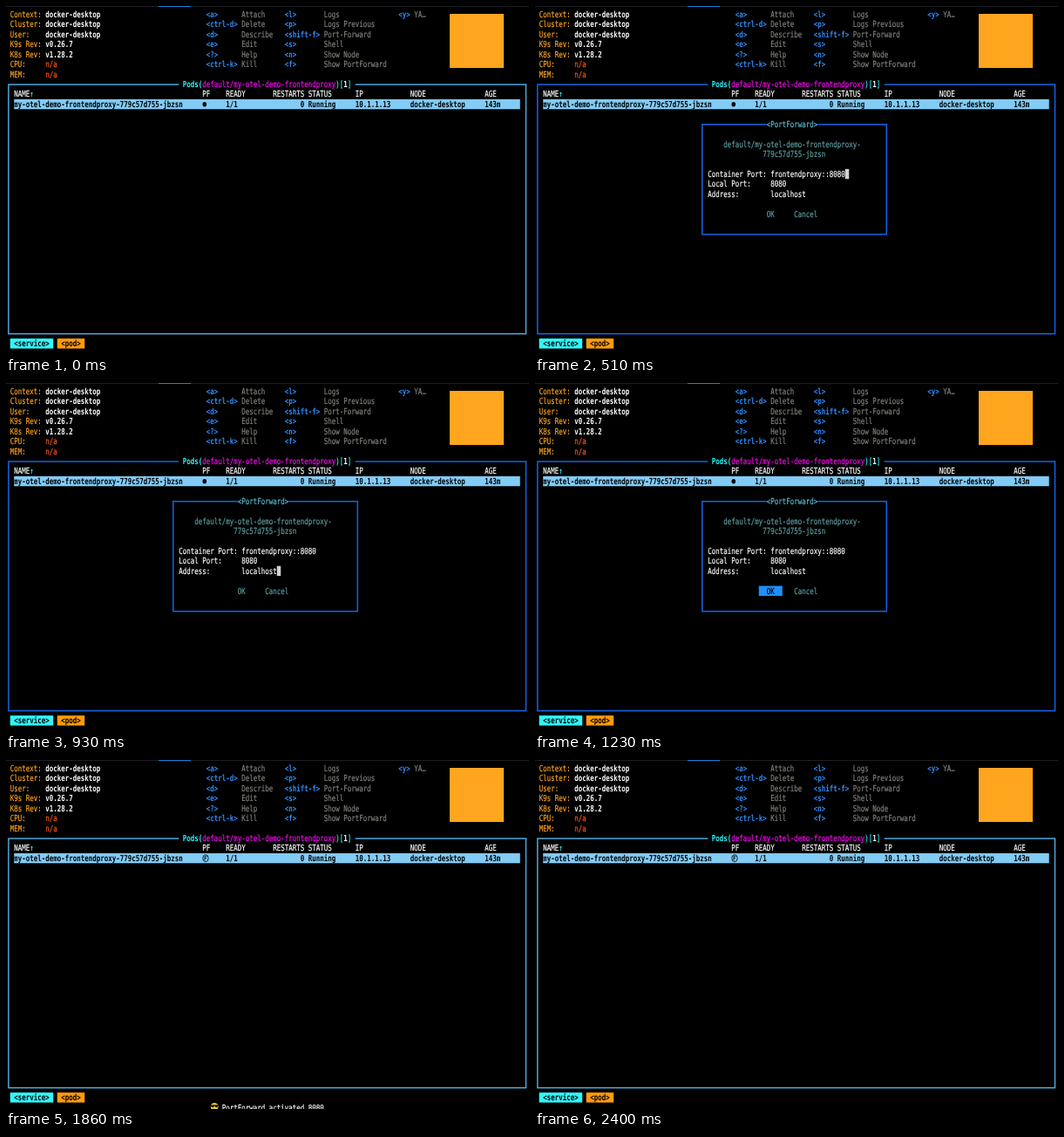
An HTML page for the animation above (2.43 s loop, 600x400 px).

```html
<!DOCTYPE html>
<html lang="en">
<head>
<meta charset="utf-8">
<title>Port forward in a terminal</title>
<style>
  html, body { margin: 0; width: 100%; height: 100%; overflow: hidden; background: #000; }
  svg { display: block; width: 600px; height: 400px; }
  text {
    font: 9.8px "DejaVu Sans Mono", "Liberation Mono", monospace;
    text-rendering: geometricPrecision;
    fill: currentColor;
    stroke: currentColor;
    stroke-width: .2;
  }
  .b { font-weight: bold; stroke: none; }
  .orange { color: #ffa51e; }
  .white { color: #fff; }
  .red { color: #ff5a14; }
  .blue { color: #2d8cfa; }
  .dim { color: #80807c; }
  .aqua { color: #28f5fa; }
  .pink { color: #fa0af5; }
  .steel { color: #5f9ea0; }
  .sky { color: #5abed2; }
  .box { fill: none; stroke: #1464e6; stroke-width: 1.5; }

  .pane, .dialog, .cur, .flash, .idle, .fwd { animation: 2430ms step-end infinite; }
  .pane { animation-name: pane; }
  .dialog { animation-name: dialog; }
  .cur.port { animation-name: port; }
  .cur.local { animation-name: local; }
  .cur.address { animation-name: address; }
  .cur.ok { animation-name: ok; }
  .flash { animation-name: flash; }
  .idle { animation-name: idle; }
  .fwd { animation-name: fwd; }

  @keyframes pane { 0%, 54.32%, 100% { stroke: #4fa8dc; } 14.81% { stroke: #1464e6; } }
  @keyframes dialog { 0%, 54.32%, 100% { opacity: 0; } 14.81% { opacity: 1; } }
  @keyframes port { 0%, 24.69%, 100% { opacity: 0; } 14.81% { opacity: 1; } }
  @keyframes local { 0%, 34.57%, 100% { opacity: 0; } 24.69% { opacity: 1; } }
  @keyframes address { 0%, 44.44%, 100% { opacity: 0; } 34.57% { opacity: 1; } }
  @keyframes ok { 0%, 54.32%, 100% { opacity: 0; } 44.44% { opacity: 1; } }
  @keyframes flash { 0%, 95.06%, 100% { opacity: 0; } 54.32% { opacity: 1; } }
  @keyframes idle { 0% { opacity: 1; } 66.67%, 100% { opacity: 0; } }
  @keyframes fwd { 0% { opacity: 0; } 66.67%, 100% { opacity: 1; } }
</style>
</head>
<body>
<svg viewBox="0 0 600 400">
  <rect width="600" height="400"/>
  <rect width="600" height="1" fill="#1c1e24"/>
  <rect x="175" width="37" height="1" fill="#1482dc"/>
  <rect x="509" y="9" width="62" height="62" fill="#ffa51e"/>
  <g id="main"></g>
  <g class="idle"><ellipse cx="227.8" cy="112.7" rx="2.3" ry="2.7"/></g>
  <g class="fwd" fill="none" stroke="#000" stroke-width=".8">
    <ellipse cx="229" cy="112.6" rx="3.2" ry="4"/>
    <path d="M228 115.2V110.3H230.7M228 112.6H230.2"/>
  </g>
  <g id="dialog" class="dialog"></g>
  <g id="flash" class="flash">
    <circle cx="239.2" cy="397.3" r="4.4" fill="#f5c83c"/>
    <path d="M235 395.3H243.4V396.3Q243 398.3 241.3 398.2Q239.9 398 239.2 396.2Q238.5 398 237.1 398.2Q235.4 398.3 235 396.3Z" fill="#141414"/>
  </g>
</svg>
<script>
const CELL = 4.5, LINE = 11.43, TOP = 3.95, BASE = 13.05;
const INSET = 0.25;
const SQUEEZE = CELL / 5.9; // the terminal is shown narrower than its font

function add(id, tag, attrs) {
  const el = document.createElementNS("http://www.w3.org/2000/svg", tag);
  for (const k in attrs) el.setAttribute(k, attrs[k]);
  return document.getElementById(id).appendChild(el);
}

function put(id, row, col, str, cls = "") {
  const move = `translate(${col * CELL + INSET} ${BASE + row * LINE}) scale(${SQUEEZE} 1)`;
  add(id, "text", { transform: move, class: cls }).textContent = str;
}

function fill(id, row, col, cols, color, cls = "") {
  add(id, "rect", {
    x: col * CELL + INSET, y: TOP + row * LINE, width: cols * CELL, height: LINE,
    fill: color, class: cls
  });
}

function frame(id, x, y, width, height, cls) {
  add(id, "rect", { x, y, width, height, class: cls });
}

// Cluster info
[
  ["Context:", "docker-desktop"], ["Cluster:", "docker-desktop"],
  ["User:", "docker-desktop"], ["K9s Rev:", "v0.26.7"],
  ["K8s Rev:", "v1.28.2"], ["CPU:", "n/a"], ["MEM:", "n/a"]
].forEach(([label, value], r) => {
  put("main", r, 1, label, "orange");
  put("main", r, 10, value, value === "n/a" ? "red" : "white b");
});

// Key hints
function hints(keyCol, textCol, items) {
  items.forEach(([key, text], r) => {
    put("main", r, keyCol, `<${key}>`, "blue b");
    put("main", r, textCol, text, "dim");
  });
}
hints(51, 60, [["a", "Attach"], ["ctrl-d", "Delete"], ["d", "Describe"],
  ["e", "Edit"], ["?", "Help"], ["ctrl-k", "Kill"]]);
hints(71, 81, [["l", "Logs"], ["p", "Logs Previous"], ["shift-f", "Port-Forward"],
  ["s", "Shell"], ["n", "Show Node"], ["f", "Show PortForward"]]);
hints(100, 104, [["y", "YA…"]]);

// Pod table
frame("main", 2.9, 90, 593.6, 285.7, "box pane");
fill("main", 7, 44, 45, "#000");
put("main", 7, 45, "Pods(", "aqua b");
put("main", 7, 50, "default/my-otel-demo-frontendproxy", "pink");
put("main", 7, 84, ")[", "aqua");
put("main", 7, 86, "1", "white b");
put("main", 7, 87, "]", "aqua");

fill("main", 9, 2, 129, "#82cbf5");
[
  [2, "NAME", "my-otel-demo-frontendproxy-779c57d755-jbzsn"],
  [50, "PF", ""], [56, "READY", "1/1"], [68, "RESTARTS", "0", 75],
  [77, "STATUS", "Running"], [89, "IP", "10.1.1.13"],
  [103, "NODE", "docker-desktop"], [122, "AGE", "143m"]
].forEach(([col, head, value, valueCol = col]) => {
  put("main", 8, col, head, "white");
  put("main", 9, valueCol, value, "b");
});
put("main", 8, 6, "↑", "aqua");

// Breadcrumbs
fill("main", 33, 1, 11, "#32f5fa");
put("main", 33, 2, "<service>", "b");
fill("main", 33, 13, 7, "#ff9b0a");
put("main", 33, 14, "<pod>", "b");

// Port forward dialog
frame("dialog", 191.8, 135.7, 211.5, 126, "box");
fill("dialog", 11, 59, 13, "#000");
put("dialog", 11, 59, "<PortForward>", "sky");
put("dialog", 13, 48, "default/my-otel-demo-frontendproxy-", "steel");
put("dialog", 14, 58, "779c57d755-jbzsn", "steel");
[
  ["Container Port:", "frontendproxy::8080", "port"],
  ["Local Port:", "8080", "local"],
  ["Address:", "localhost", "address"]
].forEach(([label, value, name], i) => {
  put("dialog", 16 + i, 44, label, "white");
  put("dialog", 16 + i, 60, value, "white");
  fill("dialog", 16 + i, 60 + value.length, 1, "#d2d2d2", "cur " + name);
});
put("dialog", 20, 59, "OK", "steel");
put("dialog", 20, 66, "Cancel", "steel");
fill("dialog", 20, 57, 6, "#1e90ff", "cur ok");
put("dialog", 20, 59, "OK", "cur ok");

put("flash", 34, 55, "PortForward activated 8080", "white");
</script>
</body>
</html>
```
